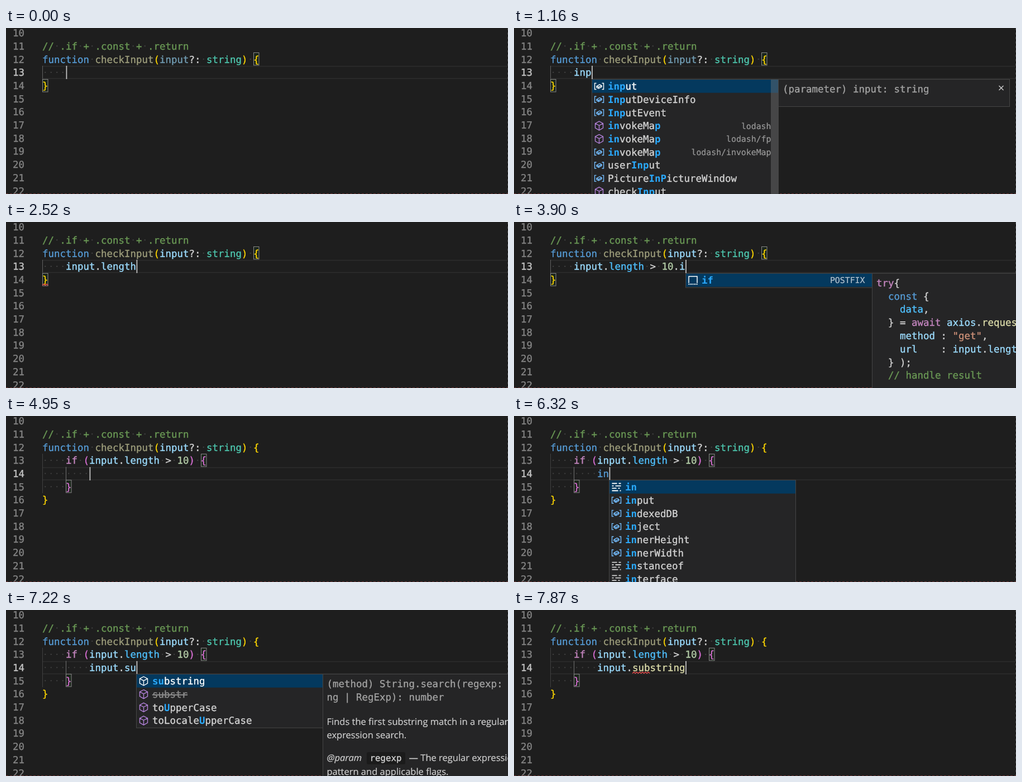
These frames come from a looping animation (899x299 px, 8 s). An HTML page:

```html
<!DOCTYPE html>
<html lang="en">
<head>
<meta charset="utf-8">
<title>Postfix completion</title>
<style>
html, body { margin: 0; width: 100%; height: 100%; overflow: hidden; background: #1e1e1e; }
svg { display: block; width: 899px; height: 299px; }
text {
  font: 17.44px "DejaVu Sans Mono", monospace; white-space: pre; text-rendering: geometricPrecision;
  fill: currentColor; stroke: currentColor; stroke-width: .35px;
}
.note { font-size: 14.85px; stroke-width: .2px; }
.chip { font-size: 15.8px; }
.prose { font: 16.5px "Open Sans", sans-serif; stroke-width: .2px; }
.hit { color: #2aaaff; font-weight: bold; stroke: none; }
</style>
</head>
<body>
<svg id="stage" viewBox="0 0 899 299"></svg>
<script>
const LOOP = 8000, CW = 10.5, LH = 23.7, LEFT = 65, LIST_W = 334;
const stage = document.getElementById("stage");

const INK = {
  c: "#6a9955", k: "#569cd6", f: "#dcdcaa", F: "#9d9d7b", v: "#9cdcfe", V: "#729db4",
  t: "#4ec9b0", w: "#d4d4d4", g: "#ffd700", o: "#da70d6", p: "#c586c0", l: "#4fc1ff",
  n: "#b5cea8", s: "#ce9178", d: "#a3a3a3"
};

const rowTop = n => 68 + (n - 13) * LH;
const colX = c => LEFT + c * CW;
const esc = s => s.replace(/&/g, "&amp;").replace(/</g, "&lt;").replace(/>/g, "&gt;");
const rect = (x, y, w, h, fill, extra = "") =>
  `<rect x="${x}" y="${y}" width="${w}" height="${h}" fill="${fill}" ${extra}/>`;
const path = (d, stroke, w = 1, extra = "") =>
  `<path d="${d}" fill="none" stroke="${stroke}" stroke-width="${w}" ${extra}/>`;
const label = (x, y, s, color, extra = "") =>
  `<text x="${x}" y="${y}" color="${color}" ${extra}>${esc(s)}</text>`;
const prose = (x, y, s, extra = "") => label(x, y, s, "#d0d0d0", `class="prose" ${extra}`);

// Markup: "~" followed by an ink key starts a coloured run.
const runs = s => s.split("~").slice(1).map(r => [r[0], r.slice(1)]);
const plain = s => runs(s).map(r => r[1]).join("");

function code(x, y, s, dots) {
  let col = 0, out = "";
  for (const [ink, str] of runs(s)) {
    out += label(x + col * CW, y, str, INK[ink]);
    if (dots) [...str].forEach((ch, i) => {
      if (ch === " ") out += `<circle cx="${x + (col + i + .5) * CW}" cy="${y - 6.3}" r="1.15" fill="#434343"/>`;
    });
    col += str.length;
  }
  return out;
}

const line = (n, s) => code(LEFT, rowTop(n) + 18.2, s, true);
const guide = (col, from, to, color) =>
  rect(Math.round(colX(col)), rowTop(from), 1, (to - from + 1) * LH, color);
const bracketBox = (n, col) =>
  rect(Math.round(colX(col)) + .5, Math.round(rowTop(n)) + .5, 9.5, 22.5, "#1b251b", 'stroke="#888"');

function squiggle(n, col, count) {
  const x = colX(col), y = rowTop(n) + 20;
  let d = `M${x} ${y + 2.5}`;
  for (let i = 1; i * 2.6 <= count * CW; i++) d += `L${x + i * 2.6} ${y + (i % 2 ? 0 : 2.5)}`;
  return path(d, "#f14c4c", 1.2);
}

/* ---- completion popup ---- */

const cube = "M0-8L7-4.3V4L0 8L-7 4V-4.3ZM-7-4.3L0-.6L7-4.3M0-.6V8";
function icon(kind, x, y, sel) {
  const art = {
    v: c => path("M-5-5.5H-8V5.5H-5M5-5.5H8V5.5H5M-4.5-.2L1-3.2L4.5-1.2V1L-1 4L-4.5 2ZM-4.5-.2L-1 1.5L4.5-1.2M-1 1.5V4", c, 1.4),
    m: c => path(cube, c, 1.4),
    k: c => path("M-8-6.5H1M4-6.5H8M-8-2.2H-5M-2-2.2H8M-8 2.2H0M3 2.2H6M-8 6.5H3M6 6.5H8", c, 1.8),
    s: c => path("M-7.5 5V-7H7.5V5", c, 1.5) + path("M-8 7H8.5", c, 1.8, 'stroke-dasharray="2 1.5"')
  };
  const ink = { v: "#75beff", m: "#b180d7", k: "#d4d4d4", s: "#d4d4d4" };
  const id = kind === "d" ? "m" : kind;
  return `<g transform="translate(${x} ${y})">${art[id](sel ? "#fff" : ink[id])}</g>`;
}

function mark(name, q) {
  const low = name.toLowerCase(), at = low.indexOf(q);
  let next = 0;
  return [...name].map((ch, i) => {
    const hit = at >= 0 ? i >= at && i < at + q.length : low[i] === q[next];
    if (hit && at < 0) next++;
    return hit ? `<tspan class="hit">${ch}</tspan>` : ch;
  }).join("");
}

// Item: "kind name|note|own query"
function list(x, y, items, query) {
  const h = items.length * LH + 2;
  let out = rect(x + .5, y + .5, LIST_W, h, "#252526", 'stroke="#454545"');
  out += rect(x + 1, y + 1, LIST_W - 1, LH, "#04395e");
  items.forEach((item, i) => {
    const kind = item[0], [name, note, own] = item.slice(2).split("|");
    const base = y + 19.2 + i * LH, sel = i === 0, old = kind === "d";
    const color = old ? "#8c8c8c" : sel ? "#fff" : "#d4d4d4";
    out += icon(kind, x + 13.5, y + 13 + i * LH, sel);
    out += `<text x="${x + 29}" y="${base}" color="${color}" ${old ? 'text-decoration="line-through"' : ""}>${mark(name, own || query)}</text>`;
    if (note) out += label(x + 321.5, base - .8, note, sel ? "#b9c6d0" : "#999", 'class="note" text-anchor="end"');
  });
  if (items.length > 8 && y < 100) out += rect(x + 321, y + 1, 13, 220, "rgba(121,121,121,.4)");
  return out;
}

function panel(x, y, h) {
  const cx = x + 399.5, cy = y + 16;
  return rect(x + .5, y + .5, 414, h, "#252526", 'stroke="#454545"') +
    path(`M${cx - 4} ${cy - 4}l8 8m0-8l-8 8`, "#d0d0d0", 1.4);
}
const snippet = (x, y, h, rows) =>
  panel(x, y, h) + rows.map((r, i) => code(x + 8, y + 23.7 + i * 23.8, r)).join("");

function docs(x, y, sig, body, param, more) {
  const top = y + 18 + sig.length * 23.8, px = x + 7.5;
  let out = panel(x, y, 230);
  sig.forEach((s, i) => out += label(px, y + 23.7 + i * 23.8, s, INK.d));
  body.forEach((s, i) => out += prose(px, top + 26.5 + i * 24, s));
  if (param) {
    const py = top + 43.5 + body.length * 24, w = param.length * 9.5;
    out += prose(px, py, "@param", 'style="font-style:italic"');
    out += rect(x + 79, py - 16, w + 12, 22, "#1b1b1b", 'rx="3"');
    out += label(x + 84.5, py, param, "#d4d4d4", 'class="chip"');
    out += prose(x + 97.5 + w, py, more[0]) + prose(px, py + 24.5, more[1]);
  }
  return out;
}

const DETAIL = {
  param: (x, y) => panel(x, y, 49) + label(x + 8, y + 23.7, "(parameter) input: string", INK.d),
  request: (x, y) => snippet(x, y, 220, [
    "~ptry~w{", "~w  ~kconst ~w{", "~w    ~ldata~w,", "~w  } = ~pawait ~vaxios~w.~frequest~w( {",
    "~w    ~vmethod ~w: ~s\"get\"~w,", "~w    ~vurl    ~w: ~vinput~w.~vlength", "~w  } );",
    "~w  ~c// handle result"]),
  branch: (x, y) => snippet(x, y, 82, ["~pif ~w(~vinput~w.~vlength ~w> ~n10~w) {", "~w", "~w}"]),
  length: (x, y) => docs(x, y, ["(property) String.length: number"], ["Returns the length of a String object."]),
  at: (x, y) => docs(x, y, ["(method) String.charAt(pos: number):", "string"],
    ["Returns the character at the specified index."], "pos", ["— The zero-based index of", "the desired character."]),
  search: (x, y) => docs(x, y, ["(method) String.search(regexp: stri", "ng | RegExp): number"],
    ["Finds the first substring match in a regular", "expression search."], "regexp",
    ["— The regular expression", "pattern and applicable flags."]),
  substring: (x, y) => docs(x, y, ["(method) String.substring(start: nu", "mber, end?: number): string"],
    ["Returns the substring at the specified location", "within a String object."], "start",
    ["— The zero-based index", "number indicating the beginning."])
};

const words = (kind, s) => s.split(" ").map(w => kind + " " + w);
const LIST = {
  inp: ["v input", "v InputDeviceInfo", "v InputEvent", "m invokeMap|lodash", "m invokeMap|lodash/fp",
    "v invokeMap|lodash/invokeMap", "v userInput", "v PictureInPictureWindow", "m checkInput"],
  input: ["v input", "v InputDeviceInfo", "v InputEvent", "v userInput", "m checkInput"],
  in: ["k in", ...words("v", "input indexedDB inject innerHeight innerWidth"), ...words("k", "instanceof interface")],
  members: words("m", "charAt charCodeAt codePointAt concat endsWith includes indexOf lastIndexOf localeCompare"),
  len: ["v length", ...words("m", "lastIndexOf localeCompare")],
  postfix: "axios await catch const for forEach forof if let".split(" ").map(w => `s ${w}|POSTFIX`),
  if: ["s if|POSTFIX"],
  s: words("m", "search slice split startsWith substring"),
  su: ["m substring", "d substr||-", "m toUpperCase||u", "m toLocaleUpperCase||u"]
};

/* ---- timeline: each step changes part of the state ---- */

const INPUT = "~vinput", DOT = INPUT + "~w.", LEN = DOT + "~vlength", CONST = DOT + "~llength";
const none = { list: "", det: "" };
const STEPS = [
  [0, { text: "", on: 1, dim: 1, err: 0, bad: 0, block: 0, tone: "v", q: "", ...none }],
  [400, { on: 0 }],
  [870, { text: "~vi", on: 1, q: "i" }],
  [950, { list: "in" }],
  [1010, { text: "~kin", q: "in" }],
  [1090, { text: "~vinp", q: "inp", list: "inp" }],
  [1160, { det: "param" }],
  [1330, { text: "~vinpu", q: "inpu", list: "input" }],
  [1530, { text: INPUT, q: "input" }],
  [1640, { text: DOT, q: "", ...none }],
  [1730, { list: "members" }],
  [1790, { det: "at" }],
  [2020, { text: DOT + "~vl", q: "l", list: "len", det: "length", err: 1, dim: 0 }],
  [2150, { text: DOT + "~vle", q: "le" }],
  [2300, { text: DOT + "~vlen", q: "len" }],
  [2520, { text: LEN, ...none }],
  [2680, { text: LEN + "~w " }],
  [2790, { text: LEN + "~w >" }],
  [2930, { text: CONST + "~w > " }],
  [3080, { text: CONST + "~w > ~n1" }],
  [3230, { text: CONST + "~w > ~n10" }],
  [3630, { text: CONST + "~w > ~n10~w.", err: 0, q: "" }],
  [3720, { list: "postfix" }],
  [3790, { det: "request" }],
  [3900, { text: CONST + "~w > ~n10~w.~vi", q: "if", list: "if" }],
  [3930, { text: CONST + "~w > ~n10~w.~vif" }],
  [4000, { det: "branch" }],
  [4500, { on: 0 }],
  [4790, { text: "", on: 1, block: 1, ...none }],
  [5180, { tone: "l" }],
  [5750, { on: 0 }],
  [6190, { text: "~vi", q: "i", on: 1 }],
  [6250, { list: "in" }],
  [6320, { text: "~kin", q: "in" }],
  [6380, { text: "~vinp", q: "inp", list: "inp" }],
  [6470, { text: "~vinpu", q: "inpu", list: "input" }],
  [6580, { text: INPUT, q: "input" }],
  [6710, { det: "param" }],
  [6850, { text: DOT, q: "", ...none }],
  [6930, { list: "members" }],
  [7000, { det: "at" }],
  [7080, { text: DOT + "~vs", q: "s", list: "s", det: "search" }],
  [7220, { text: DOT + "~vsu", q: "su", list: "su" }],
  [7280, { det: "substring" }],
  [7650, { text: DOT + "~vsubstring", ...none }],
  [7710, { bad: 1 }],
  [7870, { text: DOT + "~fsubstring" }]
];
let last = {};
const STATES = STEPS.map(([at, change]) => last = { ...last, ...change, at });

function draw(s) {
  const row = s.block ? 14 : 13, indent = s.block ? 8 : 4;
  const top = Math.round(rowTop(row)), col = indent + plain(s.text).length;
  let out = rect(0, 0, 899, 299, "#1e1e1e");
  out += rect(LEFT, top, 834, 2, "#292929") + rect(LEFT, top + 22, 834, 2, "#292929");
  for (let n = 10; n < 23; n++)
    out += label(12, rowTop(n) + 18.2, String(n), n === row ? "#c6c6c6" : "#858585");

  if (s.block) {
    out += guide(0, 13, 15, "#404040") + guide(4, 14, 14, "#707070");
    out += bracketBox(13, 27) + bracketBox(15, 4);
  } else {
    out += guide(0, 13, 13, "#606060") + bracketBox(12, 36) + bracketBox(14, 0);
  }

  out += line(11, "~c// .if + .const + .return");
  out += line(12, `~kfunction ~FcheckInput~g(~${s.dim ? "V" : "v"}input~w?: ~tstring~g) {`);
  const typed = "~w" + " ".repeat(indent) + s.text;
  if (s.block) {
    out += line(13, `~w    ~pif ~o(~vinput~w.~${s.tone}length ~w> ~n10~o) {`);
    out += line(14, typed) + line(15, "~w    ~o}") + line(16, "~g}");
  } else {
    out += line(13, typed) + line(14, "~g}");
  }
  if (s.err) out += squiggle(14, 0, 1);
  if (s.bad) out += squiggle(14, 14, 3);
  if (s.on) out += rect(colX(col) + .6, top, 1.7, 24, "#c8c8c8");

  out += path("M898.5 0V299", "#4a4a4a", 1, 'stroke-dasharray="4 4"');
  out += path("M0 298.5H899", "#6a3434", 1, 'stroke-dasharray="4 3"');

  const x = Math.round(colX(col)), y = Math.round(rowTop(row + 1));
  if (s.det) out += DETAIL[s.det](x + LIST_W, y);
  if (s.list) out += list(x, y, LIST[s.list], s.q);
  return out;
}

let shown = null;
function render(ms) {
  const t = ms % LOOP;
  const state = STATES.findLast(s => s.at <= t) || STATES[0];
  if (state !== shown) stage.innerHTML = draw(shown = state);
}

const start = performance.now();
function tick(now) {
  render(Math.max(0, now - start));
  requestAnimationFrame(tick);
}
render(0);
requestAnimationFrame(tick);
</script>
</body>
</html>
```
